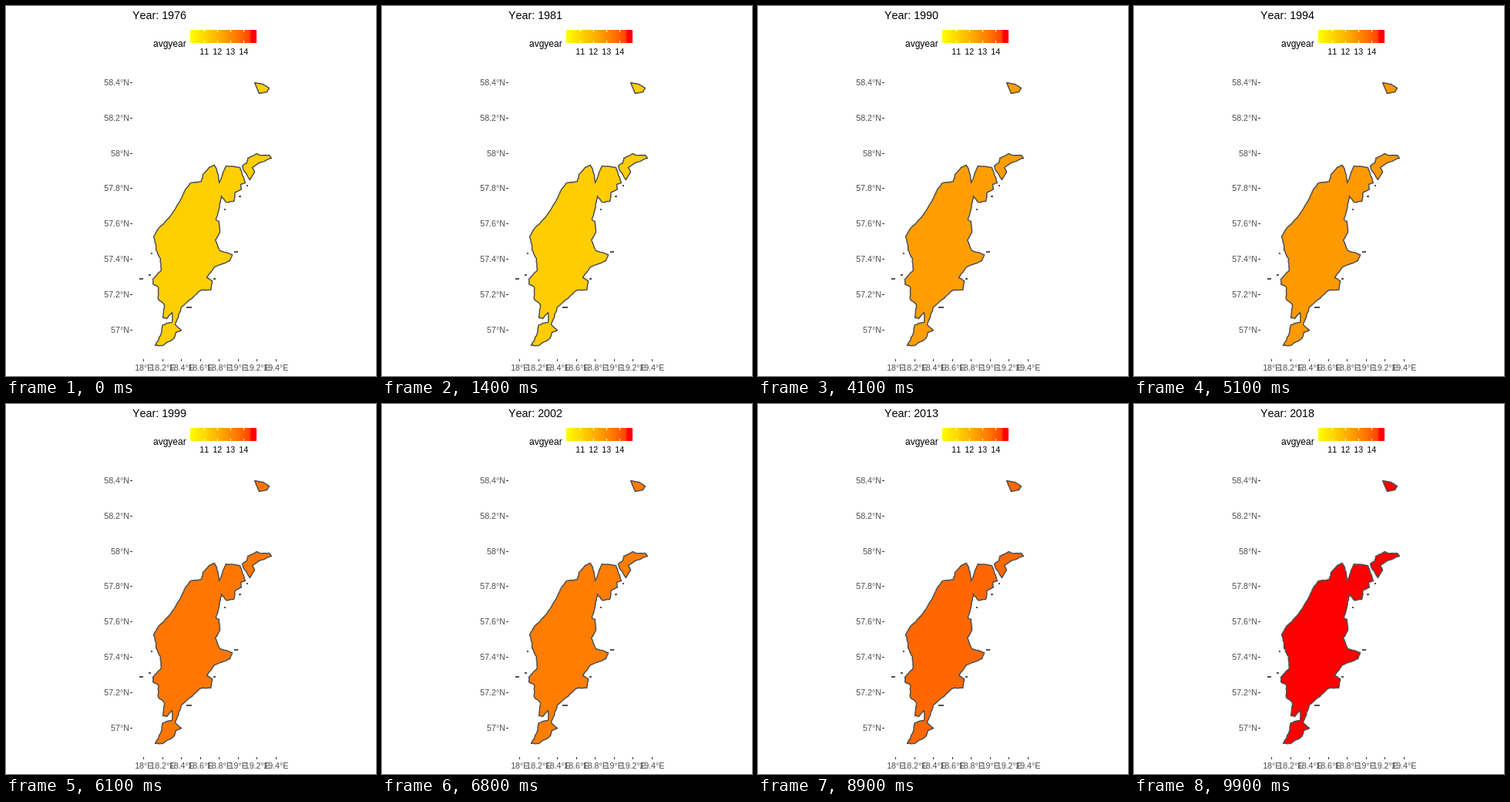
Write an HTML page with a canvas that moves like this. It is 480 px wide and 480 px high and loops after 10000 ms.

```html
<!DOCTYPE html>
<html>
<head>
<meta charset="utf-8">
<style>
html, body { margin: 0; width: 100%; height: 100%; overflow: hidden; background: #fff; }
canvas { display: block; width: 480px; height: 480px; }
</style>
</head>
<body>
<canvas id="stage" width="480" height="480"></canvas>
<script>
const ctx = document.getElementById('stage').getContext('2d');
const FONT = '"Liberation Sans", Arial, sans-serif';
const LOOP = 10000, STEP = 100, FIRST_YEAR = 1976;

// Key points of the coasts as x,y pairs; ragged() adds the fine detail
const mainIsle = ragged([
  270,206, 263,209, 255,218, 253,227, 239,229, 233,236, 225,253, 212,273, 196,290,
  191,299, 194,309, 194,316, 200,327, 201,342, 190,354, 190,360, 197,364, 197,380,
  205,387, 203,404, 208,405, 215,397, 215,410, 203,413, 200,427, 193,440, 203,440,
  217,431, 220,423, 227,420, 219,413, 222,405, 227,390, 247,373, 253,368, 265,368,
  267,356, 260,352, 270,338, 290,330, 293,322, 277,317, 271,303, 277,293, 276,279,
  272,277, 276,262, 279,246, 285,254, 295,253, 297,241, 305,237, 304,231, 310,229,
  303,209, 285,207, 276,229, 273,212], 0.7);
const northIsle = ragged([
  344,197, 341,193, 329,193, 325,191, 313,197, 312,203, 306,207, 308,213, 316,225,
  322,215, 319,209, 328,203], 0.7);
const farIsle = ragged([322,99, 333,101, 341,106, 338,111, 328,113], 0.3);

// x, y, width of the islets
const islets = [
  [173, 353, 5], [185, 348, 3], [188, 320, 2], [296, 318, 5], [269, 353, 3],
  [302, 246, 3], [283, 263, 2], [312, 232, 2], [234, 390, 7]];

// Green channel of the map by year, linear between keys; red is always full
const greenKeys = [
  [1976, 207], [1982, 204], [1984.5, 200], [1987, 235], [1988, 158], [1990, 158],
  [1994, 153], [1999, 119], [2006.5, 131], [2009, 126], [2017, 80], [2018, 0]];

function ragged(keys, amount) {
  let seed = 7;
  const jitter = () => {
    seed = (seed * 16807) % 2147483647;
    return (seed / 2147483647 - 0.5) * 2 * amount;
  };
  const points = [];
  for (let i = 0; i < keys.length; i += 2) {
    const [x, y] = [keys[i], keys[i + 1]];
    const dx = keys[(i + 2) % keys.length] - x, dy = keys[(i + 3) % keys.length] - y;
    const parts = Math.ceil(Math.hypot(dx, dy) / 3);
    for (let k = 0; k < parts; k++) {
      const wobble = k ? amount : 0;
      points.push([
        x + 0.5 + dx * k / parts + wobble * jitter(),
        y + 0.5 + dy * k / parts + wobble * jitter()]);
    }
  }
  return points;
}

function shape(points) {
  ctx.beginPath();
  for (const [x, y] of points) ctx.lineTo(x, y);
  ctx.closePath();
  ctx.fill();
  ctx.stroke();
}

function text(str, x, y, size, color, align) {
  ctx.font = size + 'px ' + FONT;
  ctx.fillStyle = color;
  ctx.textAlign = align;
  ctx.fillText(str, x, y);
}

function degrees(value, letter) {
  return +value.toFixed(1) + '°' + letter;
}

function drawLegend() {
  text('avgyear', 191, 53, 12, '#000', 'left');
  const ramp = ctx.createLinearGradient(239, 0, 325, 0);
  ['#ff0', '#ffd100', '#ffa200', '#ff6c00'].forEach((c, i) => ramp.addColorStop(i / 4, c));
  ramp.addColorStop(0.9, '#ff4200');
  ramp.addColorStop(0.92, '#f00');
  ctx.fillStyle = ramp;
  ctx.fillRect(239, 31, 86, 17);
  for (let i = 0; i < 4; i++) {
    const x = 257 + 17 * i;
    ctx.fillStyle = '#fff';
    ctx.fillRect(x, 31, 1, 3);
    ctx.fillRect(x, 45, 1, 3);
    text(String(11 + i), x + 0.3, 63, 10.7, '#000', 'center');
  }
}

function drawAxes() {
  for (let i = 0; i < 8; i++) {
    const y = Math.round(99 + 45.8 * i), x = 178.8 + 24.5 * i;
    ctx.fillStyle = '#333';
    ctx.fillRect(161, y, 3, 1);
    ctx.fillRect(Math.round(x - 0.5), 458, 1, 3);
    text(degrees(58.4 - 0.2 * i, 'N'), 160, y + 4, 10.7, '#4d4d4d', 'right');
    text(degrees(18 + 0.2 * i, 'E'), x, 473, 10.7, '#4d4d4d', 'center');
  }
}

function drawMap(green) {
  ctx.fillStyle = `rgb(255,${green},0)`;
  ctx.strokeStyle = '#505050';
  ctx.lineWidth = 1.5;
  ctx.lineJoin = 'round';
  [mainIsle, northIsle, farIsle].forEach(shape);
  ctx.fillStyle = '#505050';
  for (const [x, y, w] of islets) ctx.fillRect(x, y, w, 2);
}

// Years last three steps up to 1991, then two; the last step is halfway to the next
function dateAt(step) {
  const date = step < 47 ? (step + 1) / 3 : 16 + (step - 47) / 2;
  const year = FIRST_YEAR + Math.floor(date);
  const halfway = date % 1 >= 0.5;
  return { year, moment: halfway ? year + 0.5 : year };
}

function greenAt(moment) {
  const i = greenKeys.findIndex(([year]) => year >= moment);
  const [y1, g1] = greenKeys[i], [y0, g0] = greenKeys[Math.max(0, i - 1)];
  return Math.round(y1 === y0 ? g1 : g0 + (g1 - g0) * (moment - y0) / (y1 - y0));
}

const start = performance.now();
function draw() {
  const time = Math.max(0, performance.now() - start) % LOOP;
  const { year, moment } = dateAt(Math.floor(time / STEP));
  ctx.fillStyle = '#fff';
  ctx.fillRect(0, 0, 480, 480);
  ctx.fontKerning = 'none';
  text('Year: ' + year, 164, 17, 14.3, '#000', 'left');
  drawLegend();
  drawAxes();
  drawMap(greenAt(moment));
  requestAnimationFrame(draw);
}
draw();
</script>
</body>
</html>
```
